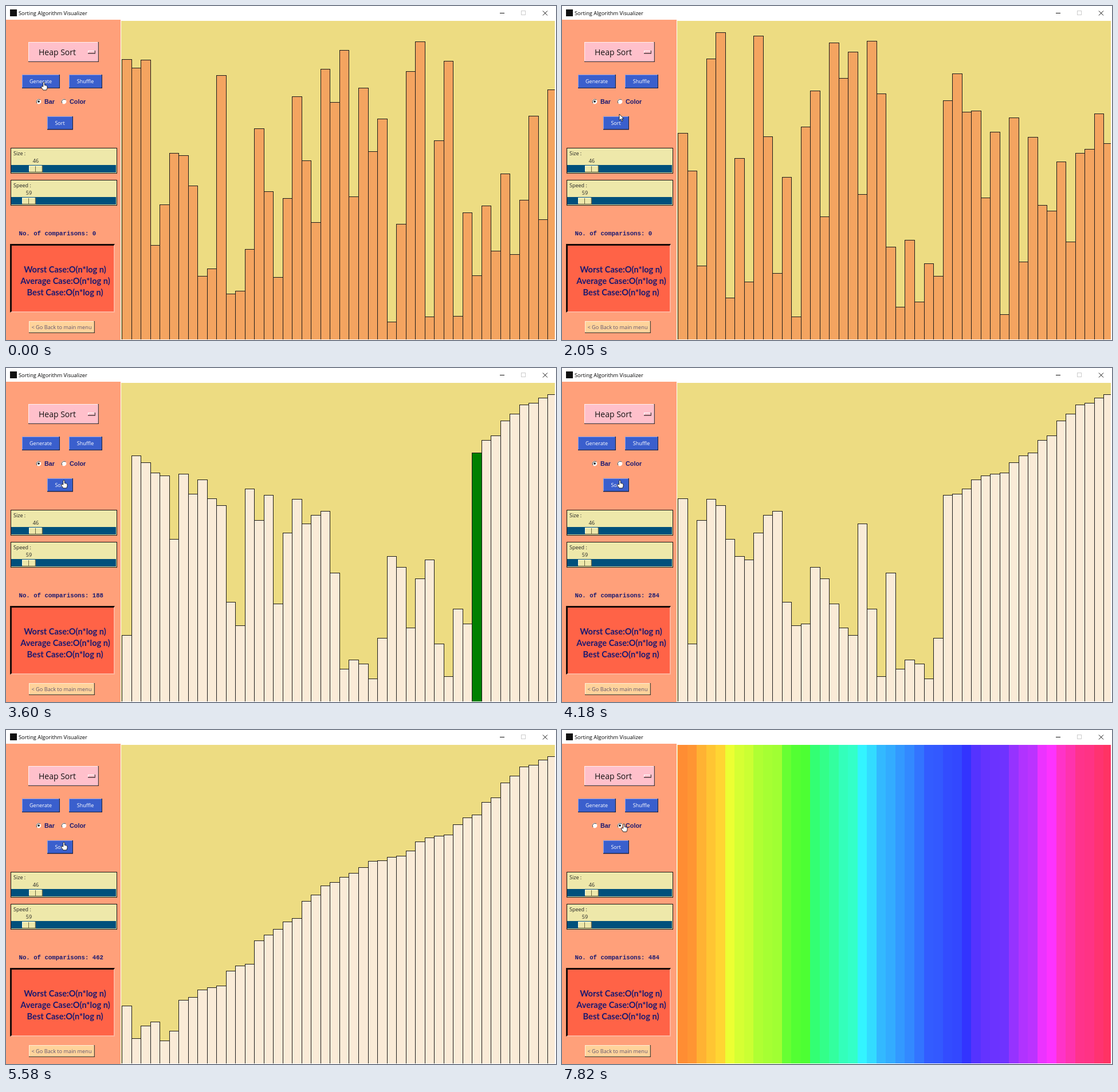
An HTML page with a canvas that plays this animation: 960x584 px, repeating every 8 s.

```html
<!DOCTYPE html>
<html lang="en">
<head>
<meta charset="utf-8">
<title>Sorting Algorithm Visualizer</title>
<style>
  html, body { margin: 0; width: 100%; height: 100%; overflow: hidden; background: #fff; }
  canvas, svg { position: absolute; left: 0; top: 0; }
  text { font: 9px "Open Sans", sans-serif; fill: #222; }
  .mid { text-anchor: middle; }
  .button text { fill: #fff; text-anchor: middle; }
  .radio text { font: bold 10.8px "Liberation Sans", sans-serif; fill: #191970; }
  .cases text { font: bold 14.6px Lato, sans-serif; fill: #191970; text-anchor: middle; }
  #count { font: bold 10.7px "Liberation Mono", monospace; fill: #191970; white-space: pre; }
</style>
</head>
<body>
<canvas id="stage" width="960" height="584"></canvas>
<svg id="panel" width="960" height="584">
  <rect x="7" y="6" width="12" height="12" fill="#111"/>
  <text x="22" y="15.5" style="font-size:9.3px;fill:#000">Sorting Algorithm Visualizer</text>
  <path d="M862 12.5h8M937 8.5l8 8m0-8l-8 8" stroke="#111" fill="none"/>
  <rect x="899.5" y="8.5" width="7" height="7" stroke="#ccc" fill="none"/>
  <rect y="24" width="200" height="560" fill="#ffa07a"/>
  <g id="widgets"></g>
  <text id="count" x="22.5" y="401"></text>
  <g class="cases">
    <rect x="7" y="416" width="183" height="120" fill="#ffb49c"/>
    <path d="M7 416h183l-2 3H10v115l-3 2z" fill="#190a07"/>
    <rect x="10" y="419" width="178" height="115" fill="#ff6347"/>
    <text x="103" y="466">Worst Case:O(n*log n)</text>
    <text x="103.5" y="486">Average Case:O(n*log n)</text>
    <text x="103" y="506">Best Case:O(n*log n)</text>
  </g>
  <g id="cursor" fill="#fff" stroke="#111" stroke-width=".9" stroke-linejoin="round">
    <path id="hand" d="M-1.3 8V1Q0-1 1.3 1V5.2L4.6 6Q6 6.5 6 8V10.5L4.7 14H-1.2L-4.6 9Q-4.6 7-3 7.3Z"/>
    <path id="arrow" d="M0 0V11L2.6 8.6 4.4 12.6 6.1 11.8 4.3 8H7.8Z"/>
  </g>
</svg>
<script>
const LOOP = 8000, X0 = 202, BAR = 16.52, RIGHT = 958, BOTTOM = 583;
const $ = id => document.getElementById(id);
const ctx = $('stage').getContext('2d');

// Bar tops in pixels; a smaller top is a larger value.
const first = [
  93, 108, 94, 418, 347, 257, 261, 314, 472, 459, 121, 503, 498, 425, 214, 324,
  474, 336, 158, 270, 378, 110, 168, 77, 333, 143, 254, 197, 552, 381, 114, 62,
  543, 235, 96, 542, 361, 471, 349, 428, 293, 434, 339, 192, 373, 146];
const second = [
  222, 288, 454, 92, 46, 510, 266, 482, 52, 228, 467, 299, 543, 211, 148, 368,
  64, 126, 80, 329, 61, 153, 421, 526, 409, 517, 450, 472, 165, 118, 185, 183,
  335, 220, 539, 195, 447, 229, 348, 358, 272, 412, 257, 250, 188, 240];
const sorted = [...second].sort((a, b) => b - a);

// Every drawing the heap sort makes, with its comparison count.
function heapSort(data) {
  const tops = [...data], steps = [];
  let count = 0;
  const swap = (i, j, green = -1) => {
    [tops[i], tops[j]] = [tops[j], tops[i]];
    steps.push({ tops: [...tops], count, green });
  };
  const heapify = (n, i) => {
    let big = i;
    count += 2;
    for (const c of [2 * i + 1, 2 * i + 2])
      if (c < n && tops[c] < tops[big]) big = c;
    if (big !== i) {
      swap(i, big);
      heapify(n, big);
    }
  };
  const n = tops.length;
  for (let i = (n >> 1) - 1; i >= 0; i--) heapify(n, i);
  for (let i = n - 1; i > 0; i--) {
    swap(0, i, i);
    heapify(i, 0);
  }
  return { steps, total: count };
}
const { steps, total } = heapSort(second);

// [start, drawings done, screen refreshes until the next entry]
const pace = [[2720, 8, 7], [3030, 32, 24], [4180, 120, 15], [4920, 173, 16], [5680, 217, 1]];
function stepAt(t) {
  const k = pace.findLastIndex(p => p[0] <= t);
  const [t0, d0, n] = pace[k], [t1, d1] = pace[k + 1];
  const part = Math.floor((t - t0) / (t1 - t0) * n) / n;
  return steps[Math.round(d0 + (d1 - d0) * part) - 1];
}

// [time, x, y] of the cursor's hot spot
const path = [
  [0, 66, 133], [1410, 66, 133], [2050, 100, 189], [2200, 101, 195], [2240, 101, 196],
  [5849, 101, 196], [5850, 106, 196], [6450, 106, 196], [6850, 113, 185],
  [7210, 108, 171], [7400, 107.5, 164], [LOOP, 107.5, 164]];
function cursorAt(t) {
  const k = path.findIndex(p => p[0] > t);
  const [t0, x0, y0] = path[k - 1], [t1, x1, y1] = path[k];
  const f = (t - t0) / (t1 - t0);
  return [x0 + (x1 - x0) * f, y0 + (y1 - y0) * f];
}
// Areas with a hand cursor: left, top, right, bottom
const hot = [[28, 120, 94, 144], [47, 156, 89, 177], [91, 156, 143, 177], [72, 193, 117, 216]];

const box = (x, y, w, h, fill) => `<rect x="${x}" y="${y}" width="${w}" height="${h}" fill="${fill}"/>`;
const raised = (x, y, w, h, fill, light, dark, edge = 1.5) =>
  box(x, y, w, h, dark) + box(x, y, w - edge, h - edge, light) +
  box(x + 1, y + 1, w - 1 - edge, h - 1 - edge, fill);

function button(x, y, w, h, label, down) {
  const [light, dark] = down ? ['#16244e', '#7d9af0'] : ['#7d9af0', '#16244e'];
  const d = down ? 1 : 0;
  return `<g class="button">${raised(x, y, w, h, '#3a5fcd', light, dark)}
    <text x="${x + w / 2 - .5 + d}" y="${y + h / 2 + 3 + d}">${label}</text></g>`;
}
function radio(x, label, on, down) {
  return `<g class="radio"><circle cx="${x}" cy="167" r="4.4" fill="${down ? '#f0f0f0' : '#fff'}"/>
    <path d="M${x - 3} 170a4.3 4.3 0 0 1 6-6" fill="none" stroke="#444"/>
    ${on ? `<circle cx="${x}" cy="167" r="1.8"/>` : ''}
    <text x="${x + 10}" y="171">${label}</text></g>`;
}
function slider(y, label, x, value) {
  return box(8, y, 186, 45, '#111') + box(9, y + 1, 184, 43, '#eee8aa') +
    box(9, y + 30, 183, 13, '#00507c') +
    raised(x, y + 31, 24, 12, '#eee8aa', '#fffbe0', '#6b6740') +
    box(x + 11, y + 32, 1, 10, '#6b6740') +
    `<text x="13" y="${y + 12.5}">${label} :</text>
     <text class="mid" x="${x + 12}" y="${y + 26}">${value}</text>`;
}

let drawn = '';
function drawWidgets(t) {
  const generate = t >= 440 && t < 620, sort = t >= 2490 && t < 2720;
  const press = t >= 7580 && t < 7780, color = t >= 7780;
  const key = [generate, sort, press, color].join();
  if (key === drawn) return;
  drawn = key;
  $('widgets').innerHTML =
    raised(39, 63, 123, 35, '#ffc0cb', '#fff0f2', '#4d3a3d') +
    '<text class="mid" x="89.5" y="86" style="font-size:14px;fill:#111">Heap Sort</text>' +
    raised(143, 78, 13, 5.5, '#ffc0cb', '#fff', '#4d3a3d') +
    button(28, 120, 66, 24, 'Generate', generate) +
    button(110, 120, 58, 24, 'Shuffle') +
    button(72, 193, 45, 23.5, 'Sort', sort) +
    radio(57, 'Bar', !color) + radio(101, 'Color', color, press) +
    slider(248, 'Size', 40, 46) + slider(304, 'Speed', 28, 59) +
    raised(40, 551, 115, 21, '#ffd39b', '#fff0d8', '#4f4230') +
    '<text class="mid" x="97" y="565" style="font-size:9.2px;fill:#5d5470">&lt; Go Back to main menu</text>';
}

function drawBars(tops, fill, green = -1) {
  ctx.strokeStyle = '#1a1a1a';
  tops.forEach((top, i) => {
    const x = Math.round(X0 + i * BAR), w = Math.round(X0 + (i + 1) * BAR) - x;
    ctx.fillStyle = i === green ? '#008000' : fill;
    ctx.fillRect(x, top, w, BOTTOM);
    ctx.strokeRect(x + .5, top + .5, w, BOTTOM);
  });
}
function drawStripes(tops) {
  tops.forEach((top, i) => {
    const x = Math.round(X0 + i * BAR);
    ctx.fillStyle = `hsl(${(584 - top) * .6425}, 100%, 60%)`;
    ctx.fillRect(x, 0, RIGHT - x, BOTTOM);
  });
}

function draw(t) {
  ctx.fillStyle = '#fff';
  ctx.fillRect(0, 0, 960, 584);
  ctx.save();
  ctx.beginPath();
  ctx.rect(201, 26, RIGHT - 201, BOTTOM - 26);
  ctx.clip();
  ctx.fillStyle = '#eddc82';
  ctx.fillRect(200, 25, 760, 560);
  let count = 0;
  if (t < 620) drawBars(first, '#f4a460');
  else if (t < 2720) drawBars(second, '#f4a460');
  else if (t < 5680) {
    const step = stepAt(t);
    count = step.count;
    drawBars(step.tops, '#faebd7', step.green);
  } else {
    count = total;
    if (t < 7820) drawBars(sorted, '#7cfc00');
    else drawStripes(sorted);
  }
  ctx.restore();

  drawWidgets(t);
  $('count').textContent = 'No. of comparisons: ' + count;
  const [x, y] = cursorAt(t);
  const hand = hot.some(([l, u, r, b]) => x >= l && x < r && y >= u && y < b);
  $('cursor').setAttribute('transform', `translate(${Math.round(x)} ${Math.round(y)})`);
  $('hand').style.display = hand ? '' : 'none';
  $('arrow').style.display = hand ? 'none' : '';
}

const start = performance.now();
function tick() {
  draw((performance.now() - start) % LOOP);
  requestAnimationFrame(tick);
}
tick();
</script>
</body>
</html>
```
